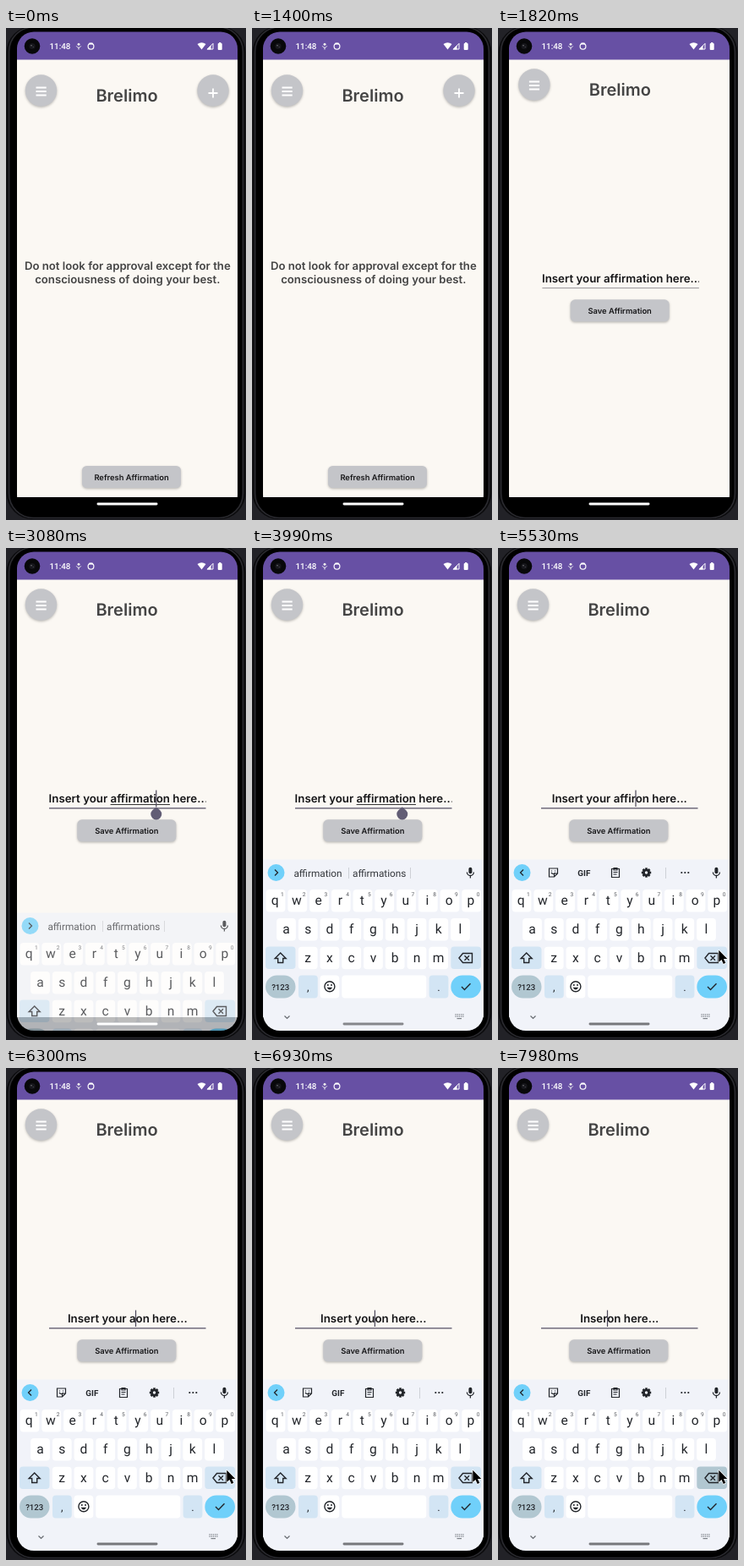
Write an HTML page with a canvas that moves like this. It is 284 px wide and 582 px high and loops after 8000 ms.

```html
<!DOCTYPE html>
<html lang="en">
<head>
<meta charset="utf-8">
<style>
html, body { margin: 0; width: 100%; height: 100%; overflow: hidden; background: #000; }
canvas { display: block; width: 284px; height: 582px; }
</style>
</head>
<body>
<canvas id="stage"></canvas>
<script>
const W = 284, H = 582, LOOP = 8000, STEP = 70;
const SCALE = Math.max(1, window.devicePixelRatio || 1);
const UI = 'Inter, sans-serif', KEY = 'Roboto, sans-serif';
const PAPER = '#fbf8f3', GREY = '#c4c5c9', BLUE = '#70d0fa', PALE = '#d3e5f4', DUSK = '#b1c7d1', INK = '#22252a';
const DELETE_TIMES = [4690, 5110, 5320, 5530, 5740, 5950, 6160, 6300, 6510, 6720, 6930, 7140, 7350, 7560, 7630, 7840];
const HEAD = 'Insert your affirmati', TAIL = 'on here...';

function prepare(canvas) {
  canvas.width = W * SCALE;
  canvas.height = H * SCALE;
  const g = canvas.getContext('2d');
  g.textRendering = 'geometricPrecision';
  g.scale(SCALE, SCALE);
  return g;
}
const main = prepare(document.getElementById('stage'));
const spare = prepare(document.createElement('canvas'));
let c = main;

const clamp = v => Math.min(1, Math.max(0, v));
const mix = (a, b, u) => a + (b - a) * u;

function box(x, y, w, h, r, fill) {
  c.beginPath();
  c.roundRect(x, y, w, h, r);
  c.fillStyle = fill;
  c.fill();
}
function disc(x, y, r, fill) {
  c.beginPath();
  c.arc(x, y, r, 0, 7);
  c.fillStyle = fill;
  c.fill();
}
function ring(x, y, r, color, width = 1.2) {
  c.beginPath();
  c.arc(x, y, r, 0, 7);
  c.strokeStyle = color;
  c.lineWidth = width;
  c.stroke();
}
function stroke(d, x, y, color, width = 1.2) {
  c.save();
  c.translate(x, y);
  c.strokeStyle = color;
  c.lineWidth = width;
  c.stroke(new Path2D(d));
  c.restore();
}
function shape(d, x, y, color) {
  c.save();
  c.translate(x, y);
  c.fillStyle = color;
  c.fill(new Path2D(d));
  c.restore();
}
function text(s, x, y, font, color, align = 'center') {
  c.font = font;
  c.textAlign = align;
  c.fillStyle = color;
  c.fillText(s, x, y);
}
function shadowed(draw) {
  c.save();
  c.shadowColor = 'rgba(0,0,0,.26)';
  c.shadowBlur = 3 * SCALE;
  c.shadowOffsetY = 1.2 * SCALE;
  draw();
  c.restore();
}
// Draws a group as one piece, so that its opacity applies to the whole.
function layer(alpha, dx, dy, draw) {
  spare.clearRect(0, 0, W, H);
  c = spare;
  c.save();
  c.translate(dx, dy);
  draw();
  c.restore();
  c = main;
  c.save();
  c.globalAlpha = alpha;
  c.drawImage(spare.canvas, 0, 0, W, H);
  c.restore();
}

const cubic = (a, b, d, e, u) => {
  const v = 1 - u;
  return a * v * v * v + 3 * b * v * v * u + 3 * d * v * u * u + e * u * u * u;
};
// Two joined curves: a quick start and a very long settling.
function pageEase(x) {
  const early = x < 1 / 6;
  const px = early ? [0, .05, .1333, .1667] : [.1667, .2083, .25, 1];
  const py = early ? [0, 0, .06, .4] : [.4, .82, 1, 1];
  let lo = 0, hi = 1;
  for (let i = 0; i < 24; i++) {
    const mid = (lo + hi) / 2;
    if (cubic(...px, mid) < x) lo = mid; else hi = mid;
  }
  return cubic(...py, lo);
}

function phone() {
  c.fillStyle = '#222227';
  c.fillRect(0, 0, W, H);
  box(.5, -2, 283, 583, 31, '#0b0b0d');
  c.beginPath();
  c.roundRect(3.5, -1, 277, 580.5, 29);
  c.strokeStyle = '#2b2b30';
  c.lineWidth = 1.5;
  c.stroke();
  box(5, 0, 274, 578.5, 27, '#000');
}
function screenClip() {
  c.beginPath();
  c.roundRect(13, 4.5, 261, 566.5, 20);
  c.clip();
}
function statusBar() {
  c.fillStyle = '#6750a4';
  c.fillRect(13, 4, 261, 33.5);
  disc(31, 21.5, 9.3, '#08080a');
  disc(31, 21.5, 3.6, '#17171c');
  disc(30, 20.8, .8, '#77777c');
  disc(32.2, 22.5, .6, '#55555c');
  text('11:48', 51.5, 25.3, '500 9.8px ' + KEY, '#fff', 'left');
  disc(86, 19.2, 1.5, '#eee');
  stroke('M-2.8 0Q0 4 2.8 0M0 1.8V4.3', 86, 21.3, '#eee', 1);
  ring(100.5, 21.8, 3.4, '#fff');
  box(98, 17.5, 5, 2, 1, '#fff');
  shape('M-5 -2.5Q0 -6 5 -2.5L0 4Z', 231.5, 21.5, '#fff');
  stroke('M3.5 -3.2V3.5H-3.2Z', 241.5, 21.5, '#fff', 1);
  shape('M1 -1V4H-4Z', 241.5, 21.5, '#fff');
  box(250.7, 18, 5, 8, 1, '#fff');
  box(252, 17, 2.4, 2, .3, '#fff');
}

function roundButton(x, y, glyph) {
  shadowed(() => disc(x, y, 18.7, GREY));
  stroke(glyph, x, y, '#fff', 1.8);
}
const BARS = 'M-6 -3.5H6.2M-6 1H6.2M-6 5.5H6.2';
function pushButton(label, x, y) {
  shadowed(() => box(x, y, 117, 26, 5.5, GREY));
  text(label, x + 58.5, y + 16.5, '600 9.35px ' + UI, '#161618');
}
function pageBase(titleY) {
  c.fillStyle = PAPER;
  c.fillRect(13, 37, 300, 518);
  text('Brelimo', 143, titleY, '600 20px ' + UI, '#444');
}
function quotePage() {
  pageBase(87);
  roundButton(41.5, 74, BARS);
  roundButton(245, 74, 'M-5.5 3H5.5M0 -2.5V8.5');
  const font = '600 13.2px ' + UI;
  text('Do not look for approval except for the', 143.8, 286, font, '#444');
  text('consciousness of doing your best.', 143.8, 302, font, '#444');
  pushButton('Refresh Affirmation', 90, 518);
}

function field(t) {
  const removed = DELETE_TIMES.filter(d => d <= t).length;
  const head = HEAD.slice(0, HEAD.length - removed);
  c.font = '600 13.3px ' + UI;
  const full = c.measureText(head + TAIL).width;
  const x = Math.max(50.6, 143.8 - full / 2);
  const caret = x + c.measureText(head).width;
  const focus = t >= 2800;
  c.save();
  c.beginPath();
  c.rect(50, 280, 186.5, 30);
  c.clip();
  text(head + TAIL, x, 301, c.font, '#151517', 'left');
  c.restore();
  c.fillStyle = focus ? '#5b566b' : '#8d8990';
  c.fillRect(51, 307.2, 185.5, focus ? 1.3 : .9);

  if (t < 2940) return;
  if (!removed) {
    const start = x + c.measureText('Insert your ').width;
    const width = c.measureText('affirmation').width;
    c.fillStyle = '#222';
    c.fillRect(start, 303, width, .9);
    shape('M0 -8.5L4.8 -4.3A6.5 6.5 0 1 1 -4.8 -4.3Z', caret, 314.8, '#625d75');
  }
  const hidden = (t >= 3500 && t < 4060) || (t >= 4550 && t < 4690);
  if (!hidden) {
    c.fillStyle = '#4a4658';
    c.fillRect(caret - .6, 286.5, 1.2, 19.5);
  }
}
function formPage(t) {
  pageBase(80);
  roundButton(41.5, 67, BARS);
  pushButton('Save Affirmation', 84.3, 321.3);
  field(t);
}

function strip(tools) {
  disc(28.5, 384, 10, BLUE);
  stroke(tools ? 'M1.5 -3.5L-2 0L1.5 3.5' : 'M-1.5 -3.5L2 0L-1.5 3.5', 28.5, 384, INK, 1.3);
  if (tools) {
    stroke('M-5 -5H5V1L1 5H-5ZM5 1H1V5M-2.5 0Q0 3 2 0M-2 -2.5V-1.5M2 -2.5V-1.5', 65.5, 384, INK, 1.2);
    text('GIF', 101.8, 387.5, '700 9.8px ' + KEY, INK);
    stroke('M-4.5 -4.5H4.5V5.5H-4.5ZM-2 -5.5H2V-3H-2ZM-2.5 -.5H2.5M-2.5 2H1.5', 139, 384, INK, 1.2);
    for (let i = 0; i < 8; i++) {
      c.save();
      c.translate(175.5, 384);
      c.rotate(i * Math.PI / 4);
      c.fillStyle = INK;
      c.fillRect(-1.3, -5.7, 2.6, 3);
      c.restore();
    }
    disc(175.5, 384, 4.5, INK);
    disc(175.5, 384, 1.7, '#f1f3f9');
    for (const x of [217.3, 221.3, 225.3]) disc(x, 384, 1.1, INK);
  } else {
    text('affirmation', 78, 388.5, '400 11.8px ' + KEY, '#33363b');
    text('affirmations', 150.7, 388.5, '400 11.8px ' + KEY, '#33363b');
  }
  c.fillStyle = '#cdd0d6';
  for (const x of tools ? [198] : [114, 187]) c.fillRect(x, 378, 1, 13);
  box(256.4, 377.8, 4, 7.5, 2, INK);
  stroke('M-4 -1A4 4 0 0 0 4 -1M0 3V6', 258.4, 384.5, INK, 1.3);
}
function keyRow(letters, x, y) {
  [...letters].forEach((letter, i) => {
    const kx = x + i * 25.75;
    box(kx - 11.4, y - 13.3, 22.8, 26.6, 4, '#fff');
    const top = y < 420;
    text(letter, kx - (top ? .8 : 0), y + 5, '400 15.6px ' + KEY, INK);
    if (top) text((i + 1) % 10, kx + 7.8, y - 5.5, '400 6.6px ' + KEY, '#55585e');
  });
}
function keyboard(t) {
  c.fillStyle = '#f1f3f9';
  c.fillRect(13, 368.5, 261, 203.5);
  strip(t >= 4690);
  keyRow('qwertyuiop', 28, 417.3);
  keyRow('asdfghjkl', 40.5, 451.3);
  keyRow('zxcvbnm', 66.2, 485);

  const pressed = t >= 7980 || DELETE_TIMES.some(d => d !== 5740 && t >= d - STEP && t < d);
  box(16, 471.5, 35.5, 26.6, 4, PALE);
  stroke('M0 -6L6.5 .5H3V5.5H-3V.5H-6.5Z', 33.7, 485, INK, 1.4);
  box(235.3, 471.5, 35.7, 26.6, 4, pressed ? DUSK : PALE);
  stroke('M-8 0L-3.5 -5.5H7.5V5.5H-3.5ZM-1.5 -2.7L4 2.7M4 -2.7L-1.5 2.7', 253, 485, INK, 1.4);

  box(16, 505.5, 35.5, 27, 13.5, DUSK);
  text('?123', 33.7, 522.5, '500 9.6px ' + KEY, INK);
  box(55, 505.5, 22.8, 27, 4, PALE);
  text(',', 66.3, 523.5, '400 13px ' + KEY, INK);
  box(80.5, 505.5, 22.8, 27, 4, '#fff');
  ring(91.9, 518.7, 6, INK, 1.4);
  disc(89.8, 517, 1, INK);
  disc(94, 517, 1, INK);
  shape('M-3.3 1H3.3Q0 6.5 -3.3 1Z', 91.9, 518.7, INK);
  box(106.3, 505.5, 100, 27, 4, '#fff');
  box(209.6, 505.5, 22.8, 27, 4, PALE);
  text('.', 221, 523.5, '400 13px ' + KEY, INK);
  box(235.3, 505.5, 35.7, 27, 13.5, BLUE);
  stroke('M-5 0L-1.5 3.5L5.5 -3.7', 253, 519, INK, 1.4);

  stroke('M-3 -1.5L0 1.5L3 -1.5', 41.5, 555, '#666a70', 1.2);
  for (let row = 0; row < 2; row++)
    for (let i = 0; i < 5; i++) box(240.4 + i * 2.2, 551.3 + row * 2.2, 1.3, 1.3, 0, '#7c8087');
  box(242.5, 556, 5.5, 1.2, 0, '#7c8087');
}
function homeBar(t) {
  const u = clamp((t - 3430) / 630);
  const rgb = [119, 120, 124].map(v => Math.round(mix(255, v, u)));
  box(107.5, 561.5, 72, 2.9, 1.5, `rgb(${rgb})`);
}
function pointer() {
  c.save();
  c.translate(261.3, 475.8);
  const d = new Path2D('M0 0V14L3.2 11.1L5.5 16.2L8 15L5.7 10.2H10Z');
  c.strokeStyle = '#fff';
  c.lineWidth = 1.4;
  c.lineJoin = 'round';
  c.stroke(d);
  c.fillStyle = '#000';
  c.fill(d);
  c.restore();
}

function draw(t) {
  c.clearRect(0, 0, W, H);
  phone();
  c.save();
  screenClip();
  c.save();
  c.beginPath();
  c.rect(13, 37, 261, 518);
  c.clip();
  c.fillStyle = PAPER;
  c.fillRect(13, 37, 261, 518);
  const since = t - 1600;
  const slide = 26 * pageEase(clamp(since / 450));
  if (since < 140) layer(1, -slide, 0, quotePage);
  if (since > 50) layer(clamp((since - 50) / 83), 26 - slide, 0, () => {
    c.fillStyle = PAPER;
    c.fillRect(-20, 37, 40, 518);
    formPage(t);
  });
  c.restore();
  statusBar();
  const rise = 1 - Math.pow(1 - clamp((t - 2920) / 400), 2.29);
  if (rise > 0) layer(mix(.15, 1, rise), 0, 203 * (1 - rise), () => keyboard(t));
  homeBar(t);
  c.restore();
  if (t >= 4480) pointer();
}

const began = performance.now();
function tick() {
  const t = (performance.now() - began) % LOOP;
  draw(Math.floor(t / STEP + .001) * STEP);
  requestAnimationFrame(tick);
}
tick();
</script>
</body>
</html>
```
